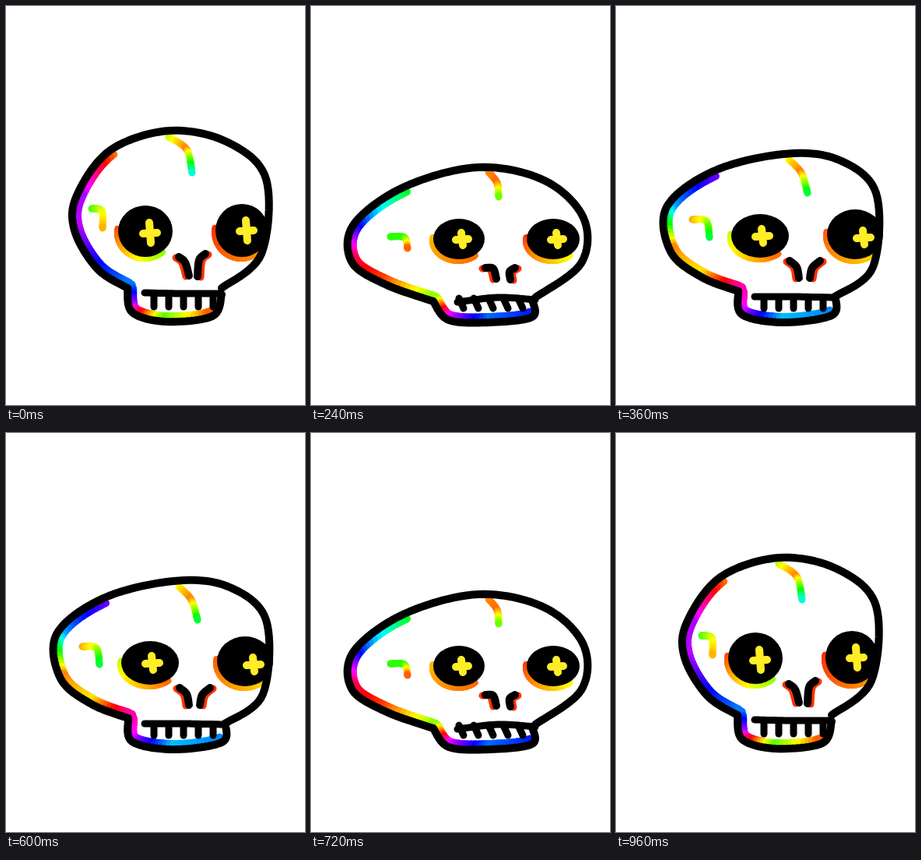
Animation, 384 px wide and 512 px high, one loop 1080 ms. Source, as an HTML page with a canvas:

```html
<!DOCTYPE html>
<html lang="en">
<head>
<meta charset="utf-8">
<title>Squashing skull</title>
<style>
  html, body { margin: 0; width: 100%; height: 100%; overflow: hidden; background: #fff; }
  canvas { display: block; width: 384px; height: 512px; }
</style>
</head>
<body>
<canvas id="stage" width="384" height="512"></canvas>
<script>
const ctx = document.getElementById('stage').getContext('2d');
const INK = '#000', GOLD = '#ffed26';
const STEP = 120, N = 12;

// Key poses: a few points per curve, hue stops for the rainbow strokes
const tall = {
  skull: [156,362, 117,337, 88,288, 91,243, 134,185, 210,160, 285,175, 334,222, 328,318, 277,362],
  jaw: [156,362, 162,393, 205,405, 265,398, 277,370],
  gum: [178,368, 226,369, 275,369],
  tooth: [0, 16],
  eyes: [179,289,35,33, 303,288,34,34],
  stars: [185,291, 309,288],
  arms: [9, 13],
  noses: [222,322, 230,329, 235,346, 256,318, 248,326, 246,347],
  crack: [209,168, 232,184, 239,214],
  temple: [110,260, 123,263, 124,285],
  rimHues: [35, -80, -75, -120, -150, -60, 100, 15],
  crackHues: [80, 30, 180],
  templeHues: [110, 70, 40],
  glowHues: [15, 85, 10, 35]
};
const squashed = {
  skull: [157,379, 95,357, 52,328, 55,280, 120,232, 215,207, 300,224, 350,272, 347,330, 288,374],
  jaw: [157,379, 177,403, 230,406, 284,399, 284,377],
  gum: [188,380, 240,374, 288,377],
  tooth: [6, 13],
  eyes: [190,299,33,26, 311,299,34,26],
  stars: [194,299, 316,299],
  arms: [8, 8],
  noses: [224,336, 234,337, 238,350, 262,336, 255,341, 256,351],
  crack: [228,213, 239,227, 241,245],
  temple: [102,296, 120,297, 124,311],
  rimHues: [120, 235, 340, 375, 450, 300, 215, 235],
  crackHues: [35, 25, 100],
  templeHues: [110, 110, 15],
  glowHues: [45, 25, 12, 60]
};
const leaning = {
  skull: [157,366, 110,348, 70,315, 65,258, 125,212, 215,190, 285,197, 334,240, 330,335, 281,373],
  jaw: [157,366, 162,396, 215,406, 277,397, 282,374],
  gum: [178,373, 226,373, 282,374],
  tooth: [0, 14],
  eyes: [185,295,37,28, 307,293,36,32],
  stars: [188,295, 318,297],
  arms: [9, 9],
  noses: [223,327, 232,335, 235,349, 262,327, 252,336, 249,349],
  crack: [222,197, 238,214, 246,240],
  temple: [98,274, 116,276, 120,297],
  rimHues: [270, 200, 30, 55, -40, -65, -165, -150],
  crackHues: [65, 30, 140],
  templeHues: [35, 70, 140],
  glowHues: [75, 25, 20, 50]
};

const lerp = (a, b, t) => a + (b - a) * t;

function between(a, b, t) {
  const pose = {};
  for (const key in a) pose[key] = a[key].map((v, i) => lerp(v, b[key][i], t));
  return pose;
}

// Five drawings, played there and back
const poses = [tall, between(tall, squashed, 0.5), squashed, leaning, between(leaning, tall, 0.5)];
const order = [0, 1, 2, 3, 4, 3, 2, 1, 0];

const chunk = (list, n) =>
  Array.from({ length: list.length / n }, (_, i) => list.slice(i * n, i * n + n));

// Catmull-Rom curve, N samples per span
function spline(list) {
  const pts = chunk(list, 2), last = pts.length - 1, out = [];
  const slope = (i, k) => (pts[Math.min(i + 1, last)][k] - pts[Math.max(i - 1, 0)][k]) / 2;
  const value = (i, k, t) => {
    const a = pts[i][k], b = pts[i + 1][k], u = 1 - t;
    const pull = slope(i, k) * u - slope(i + 1, k) * t;
    return a * u * u * (1 + 2 * t) + b * t * t * (3 - 2 * t) + pull * t * u;
  };
  for (let i = 0; i < last; i++) {
    for (let j = 0; j < N; j++) out.push([value(i, 0, j / N), value(i, 1, j / N)]);
  }
  out.push(pts[last]);
  return out;
}

// Moves a path sideways, to the left of its direction
function offset(pts, d) {
  return pts.map(([x, y], i) => {
    const a = pts[Math.max(i - 1, 0)], b = pts[Math.min(i + 1, pts.length - 1)];
    const dx = b[0] - a[0], dy = b[1] - a[1], len = Math.hypot(dx, dy) || 1;
    return [x + dy / len * d, y - dx / len * d];
  });
}

function arc(x, y, rx, ry, from, to) {
  return Array.from({ length: 4 * N }, (_, i) => {
    const a = Math.PI * lerp(from, to, i / (4 * N - 1));
    return [x + rx * Math.cos(a), y + ry * Math.sin(a)];
  });
}

function line(pts, width, color = INK) {
  ctx.strokeStyle = color;
  ctx.lineWidth = width;
  ctx.beginPath();
  pts.forEach(([x, y]) => ctx.lineTo(x, y));
  ctx.stroke();
}

function rainbow(pts, hues, width) {
  const spans = hues.length - 1;
  for (let i = 1; i < pts.length; i++) {
    const u = i / pts.length * spans, k = Math.floor(u);
    line([pts[i - 1], pts[i]], width, `hsl(${lerp(hues[k], hues[k + 1], u - k)}, 100%, 50%)`);
  }
}

function draw(p) {
  ctx.fillStyle = '#fff';
  ctx.fillRect(0, 0, 384, 512);
  ctx.fillStyle = INK;
  ctx.lineCap = ctx.lineJoin = 'round';

  const skull = spline(p.skull), jaw = spline(p.jaw);
  const eyes = chunk(p.eyes, 4), noses = chunk(p.noses, 6).map(spline);

  // The rim runs inside the skull's left side and along the jaw
  const edge = skull.slice(0, 4 * N + 1).reverse().concat(jaw.slice(1, 3 * N + 1));
  rainbow(offset(edge, 7), p.rimHues, 10);
  rainbow(spline(p.crack), p.crackHues, 9);
  rainbow(spline(p.temple), p.templeHues, 9);
  eyes.forEach(([x, y, rx, ry], i) => {
    rainbow(arc(x - 1, y + 2, rx, ry, 1.05, 0.27), p.glowHues.slice(2 * i, 2 * i + 2), 8);
  });
  noses.forEach((nose, i) => {
    const side = i ? 4 : -4;
    line(nose.map(([x, y]) => [x + side, y + 1]), 9, '#ff3300');
  });

  line(skull, 10);
  line(jaw, 10);
  line(spline(p.gum), 9);
  const [slant, drop] = p.tooth;
  for (let i = 0; i < 5; i++) {
    const x = 190 + 19 * i, y = p.gum[3] + 1;
    line([[x, y], [x + slant, y + drop]], 9);
  }
  noses.forEach(nose => line(nose, 10));

  for (const [x, y, rx, ry] of eyes) {
    ctx.beginPath();
    ctx.ellipse(x, y, rx, ry, 0, 0, 2 * Math.PI);
    ctx.fill();
  }
  const [w, h] = p.arms;
  for (const [x, y] of chunk(p.stars, 2)) {
    line([[x - 1, y - h], [x + 1, y + h]], 10, GOLD);
    line([[x - w, y + 1], [x + w, y]], 10, GOLD);
  }
}

let shown = -1;
function tick() {
  const next = order[Math.floor(performance.now() / STEP) % order.length];
  if (next !== shown) {
    shown = next;
    draw(poses[next]);
  }
  requestAnimationFrame(tick);
}
tick();
</script>
</body>
</html>
```
